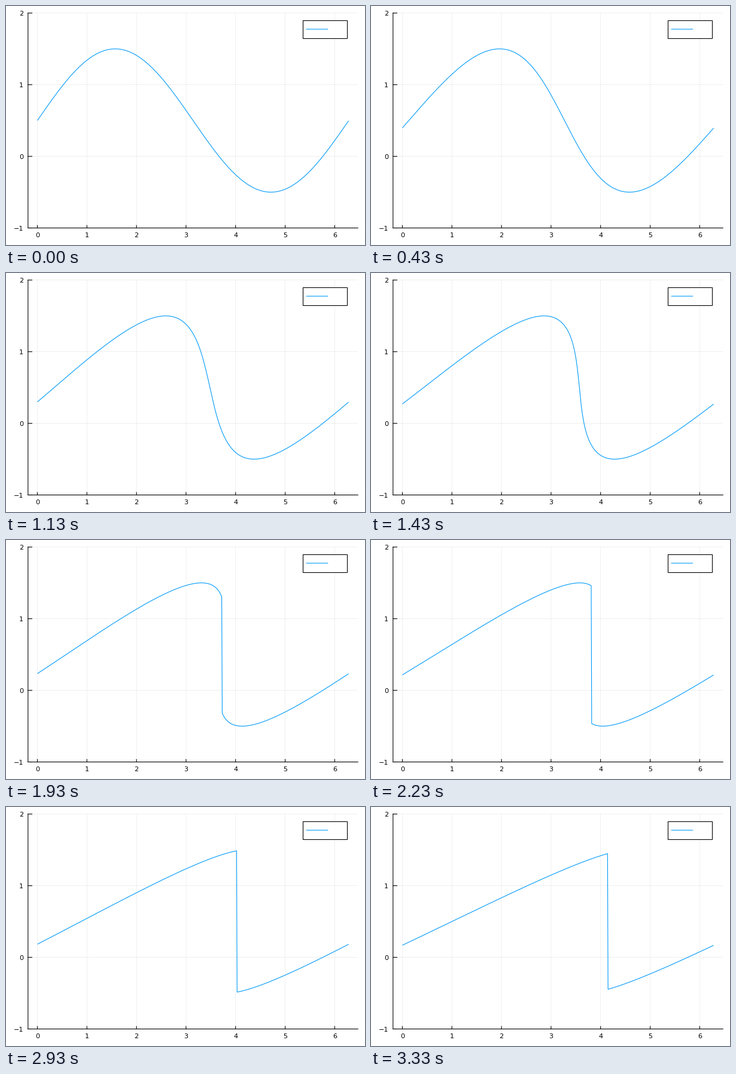
Recreate the animation shown at these times as a matplotlib script. Size 600 by 400 pixels, loop 3360 ms.

```python
import numpy as np
import matplotlib.pyplot as plt
from matplotlib.animation import FuncAnimation
from matplotlib.collections import LineCollection

W, H, DPI = 600, 400, 100
PX = 72 / DPI                      # one pixel in points
TICK_MS, LOOP_MS = 10, 3360
STEPS, DT = 100, 0.02

LEFT, RIGHT, TOP, BOTTOM = 36.8, 588.2, 11.8, 371.5
X = np.arange(0, 2 * np.pi, 0.01)
PAD = 0.03 * X[-1]
X_UNIT = (RIGHT - LEFT) / (X[-1] + 2 * PAD)
Y_UNIT = (BOTTOM - TOP) / 3


def px(x):
    return LEFT + (x + PAD) * X_UNIT


def py(y):
    return BOTTOM - (y + 1) * Y_UNIT


def burgers(t):
    """Entropy solution of u_t + u u_x = 0 with u(x, 0) = 0.5 + sin(x)."""
    phase = (X - t / 2 + np.pi) % (2 * np.pi) - np.pi
    target = np.abs(phase)
    lo, hi = np.zeros_like(X), np.full_like(X, np.pi)
    for _ in range(40):
        mid = (lo + hi) / 2
        below = mid + t * np.sin(mid) < target
        lo, hi = np.where(below, mid, lo), np.where(below, hi, mid)
    return 0.5 + np.sign(phase) * np.sin(lo)


plt.rcParams["font.family"] = "DejaVu Sans"
fig = plt.figure(figsize=(W / DPI, H / DPI), dpi=DPI, facecolor="white")
ax = fig.add_axes([0, 0, 1, 1])
ax.set_xlim(0, W)
ax.set_ylim(H, 0)
ax.axis("off")


def segments(segs, width, **style):
    lines = LineCollection(segs, linewidths=width * PX, **style)
    lines.set_snap(False)
    ax.add_collection(lines, autolim=False)


def label(x, y, text, align):
    ax.text(x, y, text, fontsize=8, ha=align, va="baseline", color="black")


x_ticks = [px(i) for i in range(7)]
y_ticks = [py(i) for i in range(-1, 3)]

grid = [[(x, TOP), (x, BOTTOM)] for x in x_ticks]
grid += [[(LEFT, y), (RIGHT, y)] for y in y_ticks]
segments(grid, 0.6, colors="black", alpha=0.1, zorder=1)

tick_x = 0.012 * (RIGHT - LEFT)
tick_y = 0.012 * (BOTTOM - TOP)
frame = [[(LEFT, TOP), (LEFT, BOTTOM)], [(LEFT, BOTTOM), (RIGHT, BOTTOM)]]
frame += [[(x, BOTTOM), (x, BOTTOM - tick_y)] for x in x_ticks]
frame += [[(LEFT, y), (LEFT + tick_x, y)] for y in y_ticks]
segments(frame, 1.1, colors="black", zorder=2, capstyle="projecting")

for i, x in enumerate(x_ticks):
    label(x, 387, str(i), "center")
for text, y in zip(["\u22121", "0", "1", "2"], y_ticks):
    label(29.2, y + 4.2, text, "right")

BLUE = "#009afa"
curve, = ax.plot([], [], color=BLUE, lw=1.1 * PX, zorder=3,
                 solid_joinstyle="round", solid_capstyle="butt")

# legend
ax.add_patch(plt.Rectangle((495.5, 23.7), 74.4, 30.2, facecolor="white",
                           edgecolor="black", lw=1.1 * PX, zorder=4))
segments([[(501.6, 38.8), (538.2, 38.8)]], 1.1, colors=BLUE, zorder=5)
label(544.2, 43, "y1", "left")

# step k starts at k thirtieths of a second, rounded to the clock tick
starts = [round(k * 100 / 3 / TICK_MS) for k in range(STEPS + 1)]
waves = [py(burgers(k * DT)) for k in range(STEPS + 1)]
curve_x = px(X)


def draw(i):
    step = np.searchsorted(starts, i, side="right") - 1
    curve.set_data(curve_x, waves[step])
    return curve,


anim = FuncAnimation(fig, draw, frames=LOOP_MS // TICK_MS, interval=TICK_MS,
                     repeat=True, repeat_delay=0)
plt.show()
```
